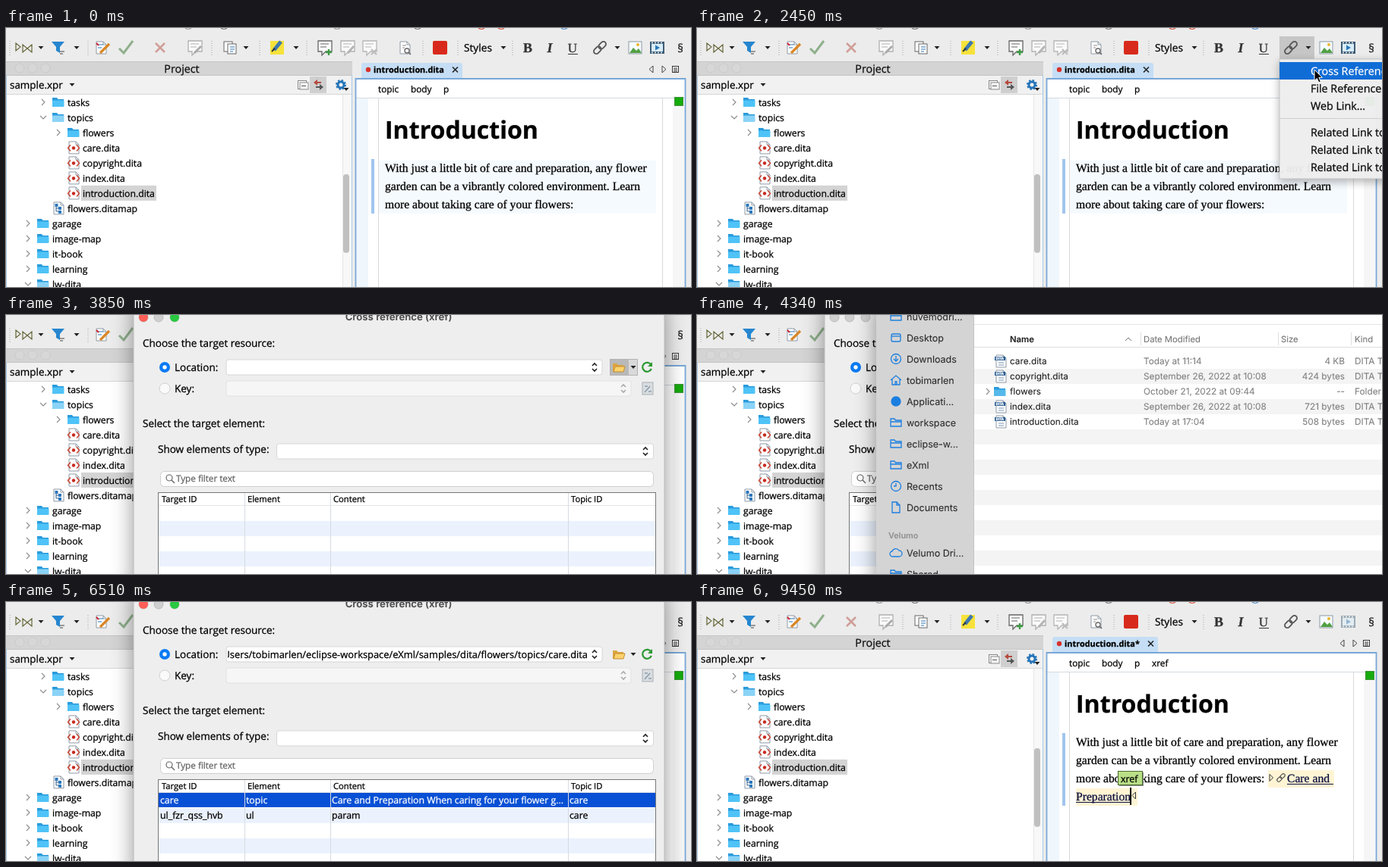
An HTML page for the animation above (9.94 s loop, 902x342 px).

```html
<!DOCTYPE html>
<html lang="en">
<head>
<meta charset="utf-8">
<title>Insert a cross reference</title>
<style>
  html, body { margin: 0; width: 100%; height: 100%; overflow: hidden; background: #ececec; }
  svg { display: block; width: 902px; height: 342px; }
  text { font-family: "Open Sans", "Noto Sans", sans-serif; white-space: pre; text-rendering: geometricPrecision; stroke-width: .28px; }
  .serif { font-family: "Liberation Serif", serif; }
  .finder { font-family: Inter, sans-serif; stroke-width: .1px; }
  .b { font-weight: 700; }
  .sb { font-weight: 600; }
  .end { text-anchor: end; }
  .mid { text-anchor: middle; }
  .window { filter: drop-shadow(0 7px 14px rgba(0, 0, 0, .42)); }
  .popup { filter: drop-shadow(0 4px 6px rgba(0, 0, 0, .3)); }
</style>
</head>
<body>
<svg id="stage" viewBox="0 0 902 342" xmlns="http://www.w3.org/2000/svg"></svg>
<script>
const LOOP = 9940;
const BLUE = '#1b7fe0';

const text = (x, y, s, size = 12.2, color = '#000', cls = '', more = '') =>
  `<text x="${x}" y="${y}" font-size="${size}" fill="${color}" stroke="${color}" class="${cls}" ${more}>${s}</text>`;
const rect = (x, y, w, h, color, more = '') =>
  `<rect x="${x}" y="${y}" width="${w}" height="${h}" fill="${color}" ${more}/>`;
const fill = (d, color, more = '') => `<path d="${d}" fill="${color}" ${more}/>`;
const line = (d, color, width = 1, more = '') =>
  `<path d="${d}" fill="none" stroke="${color}" stroke-width="${width}" ${more}/>`;
const disc = (x, y, r, color, more = '') => `<circle cx="${x}" cy="${y}" r="${r}" fill="${color}" ${more}/>`;
const at = (x, y, body, more = '') => `<g transform="translate(${x} ${y})" ${more}>${body}</g>`;
const layer = (id, body) => `<g id="${id}">${body}</g>`;
const repeat = (n, make) => Array.from({ length: n }, (_, i) => make(i)).join('');

const dropdown = (x, y, c = '#222') => fill(`M${x - 3.5} ${y - 2}h7l-3.5 4z`, c);
const stepper = (x, y, c = '#222') =>
  line(`M${x - 3} ${y - 2}l3 -3 3 3M${x - 3} ${y + 2}l3 3 3 -3`, c, 1.6);
const chevron = (x, y, open) =>
  line(open ? `M${x - 4} ${y - 2}l4 4 4 -4` : `M${x - 2} ${y - 4}l4 4 -4 4`, '#8a8a8a', 1.1);

const folder = (x, y, c = '#4fc3f7') => at(x, y,
  fill('M0 -6h6l1.5 2H15v10H0z', '#2a9bdc') + rect(0, -2.5, 15.5, 8.5, c, 'rx="1"'));
const page = (x, y, c = '#fff') => at(x, y,
  fill('M-6 -8H3l4 4V8H-6z', c, 'stroke="#8d99a6"') + line('M3 -8v4h4', '#8d99a6'));
const topicFile = (x, y) => page(x, y) +
  line(`M${x - 4} ${y - 3.5}l-3.5 4 3.5 4M${x + 4} ${y - 3.5}l3.5 4 -3.5 4`, '#c83a28', 1.3) + disc(x, y + .5, 2.2, '#c8281e');
const mapFile = (x, y) => page(x, y) +
  line(`M${x - 3} ${y - 4}v8h4M${x - 3} ${y}h4`, '#37618c') +
  rect(x - 4.5, y - 6, 4, 4, '#2d78bc') + rect(x, y - 2, 4, 4, '#2d78bc') + rect(x, y + 3, 4, 4, '#2d78bc');
const finderFile = (x, y) => page(x, y) + rect(x - 8, y - 6, 14, 5, '#2b5f93') +
  text(x - 6.5, y - 1.8, 'DITA', 4.6, '#fff', 'b') + line(`M${x - 3} ${y + 2}h7M${x - 3} ${y + 5}h7`, '#7693b3');
const chain = (x, y, scale = 1, c = '#555') => at(x, y,
  `<g transform="rotate(-45) scale(${scale})">` +
  rect(-10, -3.4, 11, 6.8, 'none', `rx="3.4" stroke="${c}" stroke-width="1.8"`) +
  rect(-1, -3.4, 11, 6.8, 'none', `rx="3.4" stroke="${c}" stroke-width="1.8"`) + '</g>');
const bubble = (x, mark, c) => at(x, 26,
  fill('M-9 -9H9V5H1l-5 5V5h-5z', '#fafafa', `stroke="${c}" stroke-width="1.3"`) +
  line('M-6 -5H5M-6 -1H2', c) + mark);
const cursor = (x, y) => at(x, y, fill('M0 0V14.5L3.4 11.4 5.8 17 8.3 15.9 5.9 10.4H10.3Z',
  '#000', 'stroke="#fff" stroke-width="1"'));

function toolbar() {
  const drops = [46, 93, 316, 382, 655].map(x => dropdown(x, 26)).join('');
  const dividers = [5, 108, 271, 334, 396, 549, 595, 667]
    .map(x => line(`M${x} 17v19`, '#a5a5a5', 1, 'stroke-dasharray="1 2"')).join('');
  const topRow = [[236, '#999'], [283, '#777'], [432, '#999'], [538, '#777'], [622, '#d4513c'], [648, '#d4513c'], [731, '#4f8fcb']]
    .map(([x, c]) => line(`M${x} 0q4 3 8 0`, c, 1.2)).join('');
  return rect(0, 0, 902, 44, '#ececec') + topRow + dividers + drops +
    line('M13 20v10l6 -5zM22 22v10l6 -5zM34 22v10l-6 -5z', '#66663a', 1.2) +
    fill('M60 18h17l-6 7v8l-5 -3v-5z', '#2686cf') + line('M71 31h6M71 34h4', '#444') +
    page(125, 26) + line('M121 22h7M121 26h5', '#2878b8', 1.2) + line('M124 33l12 -12', '#d98727', 3.2) + line('M119 20l3 3', '#c23', 2) +
    line('M149 27l6 6 12 -16', '#8fb08c', 3) +
    line('M197 20l12 12M209 20l-12 12', '#cf9f98', 2.6) +
    bubble(249, line('M-1 7l9 -9', '#aaa', 3), '#b0b0b0') +
    at(295, 26, rect(-8, -8, 11, 13, '#fff', 'stroke="#666"') + rect(-3, -5, 11, 13, '#fff', 'stroke="#666"') + line('M0 -1h6M0 2h6M0 5h4', '#3277b5')) +
    rect(348, 17, 18, 18, '#f7e23a') + line('M353 29l9 -11', '#3e79ae', 5) + line('M350 31l4 -4', '#333', 2) +
    bubble(420, line('M5 2v8M1 6h8', '#3f9b45', 2.3), '#666') +
    bubble(450, line('M0 7l8 -9', '#b5b5b5', 3), '#b0b0b0') +
    bubble(479, line('M2 2l7 7M9 2l-7 7', '#bbb', 2), '#b5b5b5') +
    page(525, 26) + line('M522 23h5M522 26h3', '#888') + disc(528, 30, 3, 'none', 'stroke="#666" stroke-width="1.3"') + line('M530 32l3 3', '#666', 1.5) +
    rect(562, 17, 19, 18, '#d82a1c', 'rx="2"') +
    text(603, 31, 'Styles', 13.7) +
    text(687, 32, 'B', 18, '#333', 'serif b mid') +
    text(716, 32, 'I', 18, '#333', 'serif b mid', 'font-style="italic"') +
    text(746, 32, 'U', 17, '#333', 'serif mid') + line('M740 34.5h13', '#333') +
    layer('linkHot', rect(767, 11, 46, 31, '#c6c6c6')) +
    chain(782, 26) + dropdown(805, 26) +
    rect(820, 18, 17, 16, '#f6fbff', 'stroke="#8b9aa6"') + fill('M821 33l5 -7 4 4 3 -3 4 6z', '#53a044') + disc(832, 22, 2, '#eab52b') +
    layer('film', rect(848, 18, 19, 16, '#3d5d77') + rect(850, 21, 15, 10, '#d9edf7') +
      line('M850 19.5h16M850 32.5h16', '#fff', 1.5, 'stroke-dasharray="2 2"') + fill('M855 22.5v7l6 -3.5z', '#2878b8')) +
    text(888, 32, '§', 15, '#222', 'mid');
}

function projectPanel() {
  const rows = [
    [49, 'tasks', 'folder'], [49, 'topics', 'folder', 1], [69, 'flowers', 'folder'],
    [69, 'care.dita', 'topic'], [69, 'copyright.dita', 'topic'], [69, 'index.dita', 'topic'],
    [69, 'introduction.dita', 'topic'], [49, 'flowers.ditamap', 'map'], [29, 'garage', 'folder'],
    [29, 'image-map', 'folder'], [29, 'it-book', 'folder'], [29, 'learning', 'folder'], [29, 'lw-dita', 'folder', 1]
  ];
  const tree = rows.map(([x, label, kind, open], i) => {
    const y = 98 + 20 * i;
    const icon = kind === 'folder' ? chevron(x, y, open) + folder(x + 12, y, open ? '#8ad3f6' : '#4fc3f7')
      : kind === 'map' ? mapFile(x + 20, y) : topicFile(x + 20, y);
    return icon + text(x + 32, y + 5, label);
  }).join('');
  return rect(0, 44, 456, 19, '#d4d4d4') + line('M0 44.5h456M0 62.5h456', '#c4c4c4') +
    [18, 35, 52].map(x => disc(x, 53, 6, '#d7d7d7', 'stroke="#cbcbcb"')).join('') +
    text(231.5, 59, 'Project', 14.3, '#111', 'mid') +
    rect(0, 63, 456, 24, '#f1f1f1') + text(5, 80, 'sample.xpr', 13.4) + dropdown(87, 75) +
    rect(384.5, 69.5, 11, 11, '#fafafa', 'stroke="#888"') + rect(387, 72, 11, 9, '#fafafa', 'stroke="#888"') + line('M389 76.5h6', '#555') +
    rect(400, 64, 22, 22, '#cfcfcf') +
    fill('M405 72l5 -4v3h5v2h-5v3z', '#b5493d') + fill('M418 78l-5 -4v3h-5v2h5v3z', '#555') +
    disc(441, 75, 4, 'none', 'stroke="#2474b8" stroke-width="3"') +
    disc(441, 75, 6, 'none', 'stroke="#2474b8" stroke-width="2" stroke-dasharray="2.4 2.3"') + dropdown(448, 81) +
    rect(0, 87, 456, 255, '#fff') + line('M0 87.5h456', '#d5d5d5') +
    rect(443, 88, 12, 254, '#f8f8f8') + line('M443.5 88v254', '#e6e6e6') + rect(444, 193, 8, 104, '#c0c0c0', 'rx="4"') +
    rect(99, 208, 99, 20, '#d4d4d4') + tree +
    line('M.5 62v280M455.5 62v280', '#a9c9e6');
}

function tab(label, right) {
  return fill(`M468 66V49q0 -3 3 -3H${right - 3}q3 0 3 3V66z`, '#c5def5') + disc(477, 55, 3.2, '#d8322a') +
    text(484, 59, label, 10.9, '#000', 'b') + line(`M${right - 13} 51.5l7 7m0 -7l-7 7`, '#222', 1.6);
}

function editor() {
  const words = (x, y, s) => text(x, y, s, 15.65, '#000', 'serif');
  const link = (x, y, s) => text(x, y, s, 15.65, '#0c1040', 'serif');
  return rect(456, 44, 446, 298, '#ececec') +
    rect(461, 67, 433, 275, '#fff') + rect(462, 92, 15, 250, '#eff7fc') +
    line('M461 92.5h433', '#d4dbe2') + line('M490.5 93v249M864.5 93v249', '#d9d9d9') +
    rect(878, 93, 15, 249, '#f6f6f6') + line('M460.5 342V67H894.5V342', '#78a7d8', 1.8) +
    line('M852 50l-5 4.5 5 4.5zM864 50l5 4.5 -5 4.5z', '#444') +
    rect(877.5, 50.5, 8, 8, '#fff', 'stroke="#333"') + line('M879 53h5M879 55h5M879 57h5', '#333') +
    layer('okMark', rect(880.5, 91.5, 11, 11, '#16ab0d', 'stroke="#3f8f3a"')) +
    [[490, 'topic'], [533, 'body'], [576, 'p']].map(([x, s]) => text(x, 85, s, 11.8)).join('') +
    layer('before', tab('introduction.dita', 601) + rect(491, 175, 365, 70, '#f5fafe') + rect(481, 173, 4, 72, '#a1c5ee')) +
    layer('after', tab('introduction.dita*', 607) + text(599, 85, 'xref', 11.8) +
      rect(481, 173, 4, 96, '#a1c5ee') +
      rect(752, 222, 87, 23, '#fff5d4') + rect(499, 246, 81, 23, '#fff5d4')) +
    text(499, 146, 'Introduction', 32.1, '#000', 'b') +
    words(499, 190, 'With just a little bit of care and preparation, any flower') +
    words(499, 214, 'garden can be a vibrantly colored environment. Learn') +
    words(499, 238, 'more about taking care of your flowers:') +
    layer('xref', line('M754 227.5v9l4.5 -4.5zM577.5 251v9l-4.5 -4.5z', '#333') + chain(769, 232, .65) +
      link(777, 238, 'Care and') + link(499, 262, 'Preparation') + line('M777 240.5h61M499 264.5h72', '#0c1040') +
      rect(556, 225, 32, 18, '#8a8a8a') + rect(554.5, 223.5, 32, 18, '#b9df87', 'stroke="#4b6b2f"') +
      text(558, 237.5, 'xref', 12.4)) +
    layer('caret', rect(570, 245, 2, 23, '#000'));
}

function menu() {
  const items = [[62, 'Cross Reference...'], [85, 'File Reference...'], [108, 'Web Link...'],
    [143, 'Related Link to Topic'], [166, 'Related Link to File'], [189, 'Related Link to Web']];
  return rect(767, 41, 150, 158, '#eeeeee', 'class="popup" stroke="#c4c4c4"') +
    items.map(([y, s]) => text(808, y, s, 14.3)).join('') + line('M767 119.5h135', '#cfcfcf') +
    layer('menuHot', rect(767, 45, 135, 23, '#0868d6') + text(808, 62, items[0][1], 14.3, '#fff'));
}

function dialog() {
  const label = (x, y, s) => text(x, y, s, 13.5);
  const field = (x, y, w, color = '#fff', edge = '#d6d6d6') => rect(x, y, w, 20, color, `rx="3" stroke="${edge}"`);
  const cells = (y, color, values) => [203, 316, 429, 742].map((x, i) => text(x, y, values[i], 12.3, color)).join('');
  return rect(168, -20, 699, 400, '#eeeeee', 'class="window" stroke="#bdbdbd"') +
    [181, 201, 222].map(x => disc(x, 3, 6, '#cfcfcf', 'stroke="#bcbcbc"')).join('') +
    layer('lights', disc(181, 3, 6, '#fe5f57') + disc(222, 3, 6, '#28c840')) +
    text(517, 7, 'Cross reference (xref)', 13.2, '#4b4b4b', 'finder sb mid') +
    label(180, 42, 'Choose the target resource:') +
    disc(209, 69, 7, '#0a7bf4') + disc(209, 69, 2.7, '#fff') + label(222, 74, 'Location:') + field(290, 59, 495) +
    layer('ring', rect(290.5, 58.5, 495, 21, '#fff', 'rx="3" stroke="#8fbbe9" stroke-width="2"')) + stepper(775, 69) +
    layer('path', `<svg x="292" y="58" width="475" height="22">` +
      text(474, 15.5, '/Users/tobimarlen/eclipse-workspace/eXml/samples/dita/flowers/topics/care.dita', 12.85, '#000', 'end') + '</svg>') +
    layer('hover', rect(795.5, 58.5, 36, 21, '#e6e6e6', 'stroke="#bcbcbc"') + line('M820.5 59v20', '#bcbcbc')) +
    layer('pressed', rect(795.5, 58.5, 36, 21, '#d9d9d9', 'stroke="#b3b3b3"') + rect(796, 59, 24, 20, '#b9b9b9')) +
    fill('M799 75V64h5l2 2h7v9z', '#dca642') + fill('M800 75l2 -7h13l-2 7z', '#fcd26d', 'stroke="#c28c2e"') + dropdown(826, 69) +
    line('M849.5 66a6 6 0 1 0 .3 5', '#2c9832', 2.2) + fill('M851 62v6h-6z', '#2c9832') +
    disc(209, 97, 7, '#fafafa', 'stroke="#d0d0d0"') + label(222, 102, 'Key:') + field(290, 87, 533, '#f6f6f6', '#e2e2e2') + stepper(813, 97, '#aaa') +
    rect(838, 89, 14, 16, '#d9dde0', 'stroke="#a9b0b6"') + line('M841 102l7 -8M841 94h4M846 101h4', '#8c9dae', 1.5) +
    label(180, 148, 'Select the target element:') + label(200, 182, 'Show elements of type:') +
    field(356.5, 170, 496) + stepper(842, 180) +
    rect(203.5, 206.5, 649, 20, '#fff', 'rx="5" stroke="#cfcfcf"') + disc(215, 215, 4, 'none', 'stroke="#666" stroke-width="1.2"') +
    line('M218 218l4 4', '#666', 1.4) + text(224, 220, 'Type filter text', 11.7, '#666') +
    rect(200.5, 234.5, 655, 120, '#fff', 'stroke="#777"') +
    repeat(2, i => rect(201, 272 + 40 * i, 654, 20, '#ebf2fd')) +
    [[205, 'Target ID'], [318, 'Element'], [431, 'Content'], [744, 'Topic ID']].map(([x, s]) => text(x, 247, s, 11.2)).join('') +
    layer('results', rect(201, 252, 654, 19, '#0850d5') +
      cells(266, '#fff', ['care', 'topic', 'Care and Preparation When caring for your flower g...', 'care']) +
      cells(286, '#000', ['ul_fzr_qss_hvb', 'ul', 'param', 'care'])) +
    line('M314.5 235v107M427.5 235v107M740.5 235v107', '#d6dbe2') + line('M201 251.5h654', '#e4e4e4');
}

function chooser() {
  const ui = (x, y, s, size, color, cls = '') => text(x, y, s, size, color, 'finder ' + cls);
  const glyphs = {
    folder: '<path d="M-7 5V-5h5l1.5 2H7V5zM-7 -1H7"/>',
    desk: '<rect x="-6" y="-5" width="12" height="10" rx="2"/><path d="M-6 -2H6"/>',
    down: '<circle r="6.5"/><path d="M0 -4v7M-3 0l3 3 3 -3"/>',
    home: '<path d="M-7 0L0 -6 7 0M-5 -1V6H5V-1M-1 6V2h2v4"/>',
    dot: `<circle r="6" fill="${BLUE}"/>`,
    clock: '<circle r="6.5"/><path d="M0 -4V0H-3"/>',
    doc: '<path d="M-5 -7H1l4 4V7H-5zM1 -7v4h4"/>',
    cloud: '<path d="M-4 5a3.5 3.5 0 0 1 -1 -7a5 5 0 0 1 9 -1a4 4 0 0 1 0 8z"/>'
  };
  const places = [[2, 'nuvemodri...', 'folder'], [30, 'Desktop', 'desk'], [58, 'Downloads', 'down'], [86, 'tobimarlen', 'home'],
    [114, 'Applicati...', 'dot'], [142, 'workspace', 'folder'], [170, 'eclipse-w...', 'folder'], [198, 'eXml', 'folder'],
    [226, 'Recents', 'clock'], [254, 'Documents', 'doc'], [314, 'Velumo Dri...', 'cloud'], [342, 'Shared', 'folder']];
  const files = [['care.dita', 'Today at 11:14', '4 KB'], ['copyright.dita', 'September 26, 2022 at 10:08', '424 bytes'],
    ['flowers', 'October 21, 2022 at 09:44', '--'], ['index.dita', 'September 26, 2022 at 10:08', '721 bytes'],
    ['introduction.dita', 'Today at 17:04', '508 bytes']];
  const row = ([name, date, size], i, main = '#222', rest = '#808080') => {
    const y = 61 + 20 * i, isFolder = name === 'flowers';
    return (isFolder ? chevron(383, y) + folder(391, y, '#55b9ea') : finderFile(400, y)) +
      ui(412, y + 4, name, 11.8, main) + ui(588, y + 4, date, 11.8, rest) +
      ui(853, y + 4, size, 11.8, rest, 'end') + ui(866, y + 4, isFolder ? 'Folder' : 'DITA Topic', 11.8, rest);
  };
  return rect(236, -20, 700, 400, '#fff', 'class="window"') + rect(236, 0, 128, 342, '#d5d4d4') + line('M364.5 0v342', '#c3c3c3') +
    places.map(([y, s, icon]) => at(262, y, glyphs[icon], `fill="none" stroke="${BLUE}" stroke-width="1.3"`) +
      ui(276, y + 4.5, s, 12.5, '#2d2d2d')).join('') +
    ui(252, 295, 'Velumo', 10.8, '#929292', 'sb') +
    line('M365 12.5h537', '#e4e4e4') + line('M365 42.5h537M584.5 23v17M765.5 23v17M861.5 23v17', '#dedede') +
    ui(412, 35.5, 'Name', 11.3, '#222', 'sb') + line('M564 34l4 -4 4 4', '#777') +
    [[588, 'Date Modified'], [769, 'Size'], [866, 'Kind']].map(([x, s]) => ui(x, 35.5, s, 11.3, '#777')).join('') +
    repeat(7, i => rect(365, 71 + 40 * i, 537, 20, '#f4f4f5')) +
    layer('files', files.map((f, i) => row(f, i)).join('')) +
    layer('picked', rect(365, 51, 537, 20, '#0a5fd7') + row(files[0], 0, '#fff', '#fff'));
}

document.getElementById('stage').innerHTML =
  toolbar() + projectPanel() + editor() + layer('menu', menu()) + layer('dialog', dialog()) + layer('chooser', chooser()) +
  layer('arrowButton', cursor(806, 26)) + layer('arrowItem', cursor(813, 55)) +
  layer('arrowFolder', cursor(810, 60)) + layer('arrowField', cursor(456, 54));

// Each layer: [start ms, opacity from then on]; hidden before its first step.
const steps = {
  linkHot: [[840, 1], [2590, 0]],
  menu: [[1260, .6], [1330, 1], [2450, .96], [2520, .5], [2590, 0]],
  menuHot: [[1750, 1]],
  arrowButton: [[1470, 1], [1610, 0]],
  arrowItem: [[1750, 1], [3360, 0]],
  arrowFolder: [[3360, 1], [3780, 0]],
  arrowField: [[6230, 1], [6370, 0]],
  dialog: [[2590, .5], [2660, 1], [8330, .5], [8400, 0]],
  lights: [[2590, 1], [4130, 0], [5880, 1]],
  hover: [[2730, 1], [3500, 0]],
  pressed: [[3500, 1], [5880, 0]],
  ring: [[5810, 1], [6370, 0]],
  path: [[6370, 1]],
  results: [[6440, 1]],
  chooser: [[4130, .5], [4200, 1], [5810, 0]],
  files: [[4340, 1]],
  picked: [[5460, 1]],
  before: [[0, 1], [8820, 0]],
  after: [[8820, 1]],
  xref: [[8820, 1]],
  film: [[0, 1], [8820, .45]],
  caret: [[8820, 1], [8960, 0], [9380, 1]],
  okMark: [[0, 1], [9380, 0], [9450, 1]]
};
const tracks = Object.entries(steps).map(([id, list]) => [document.getElementById(id), list]);

function draw(now) {
  const t = now % LOOP;
  for (const [node, list] of tracks) {
    let opacity = 0;
    for (const [start, value] of list) if (t >= start) opacity = value;
    node.setAttribute('opacity', opacity);
  }
}

const begin = performance.now();
function tick() {
  draw(performance.now() - begin);
  requestAnimationFrame(tick);
}
tick();
</script>
</body>
</html>
```
